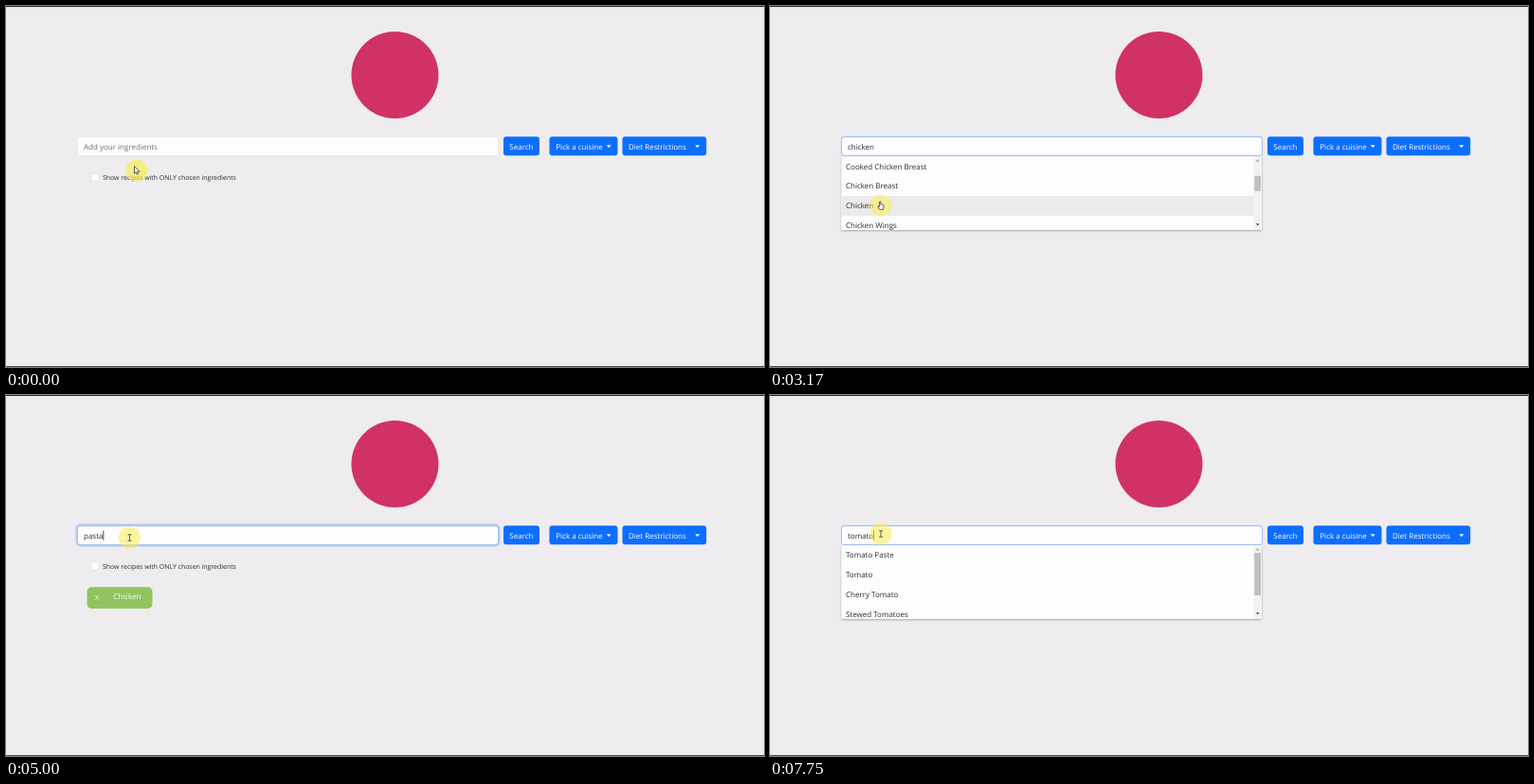
An HTML page that plays this animation: 800 px wide and 382 px high, repeating every 8 s.

```html
<!DOCTYPE html>
<html lang="en">
<head>
<meta charset="utf-8">
<title>Recipe search</title>
<style>
  html, body { margin: 0; width: 100%; height: 100%; overflow: hidden; background: #eeecee; }
  svg { display: block; width: 100%; height: 100%; }
  text { font: 8px "Open Sans", "Noto Sans", sans-serif; fill: #2b2e32; white-space: pre; text-rendering: geometricPrecision; }
  .blue { fill: #0d6efd; }
  .light { fill: #fff; }
  .paper { fill: #fdfcfe; }
  .icon { stroke-linejoin: round; stroke-linecap: round; }
</style>
</head>
<body>
<svg viewBox="0 0 800 382">
  <defs>
    <clipPath id="listClip"><rect id="clipBox" x="75.5" y="159" width="443.5"/></clipPath>
    <filter id="shadow" x="-5%" y="-20%" width="110%" height="150%">
      <feDropShadow dx="0" dy="1" stdDeviation="1.2" flood-opacity=".3"/>
    </filter>
  </defs>
  <rect width="800" height="382" fill="#eeecee"/>
  <rect width="800" height="1" fill="#29282b"/>
  <rect y="381" width="800" height="1" fill="#4a494c"/>
  <circle cx="410.5" cy="73" r="46" fill="#d03264"/>

  <g id="ring">
    <rect id="glow" fill="#b6cdf2"/>
    <rect x="75.5" y="138.4" width="444" height="20.1" rx="3" fill="#86b7fe"/>
  </g>
  <rect class="paper" x="76" y="139" width="443" height="19" rx="2.5"/>
  <text id="query" x="82" y="151.8"></text>
  <rect id="caret" y="143.5" width=".8" height="10" fill="#222"/>

  <g class="blue">
    <rect x="525" y="138.3" width="38" height="20" rx="3"/>
    <rect x="573.5" y="138.3" width="72" height="20" rx="3"/>
    <rect x="650.5" y="138.3" width="88.7" height="20" rx="3"/>
  </g>
  <text class="light" x="531.3" y="151.8">Search</text>
  <text class="light" x="580.3" y="151.8">Pick a cuisine</text>
  <text class="light" x="657" y="151.8">Diet Restrictions</text>
  <path class="light" d="M633.7 147.3h5l-2.5 2.6zM727.3 147.3h5l-2.5 2.6z"/>

  <rect class="paper" x="90.3" y="177.3" width="7.6" height="7.6" rx="1.5" stroke="#dedce0" stroke-width=".5"/>
  <text x="102" y="184.4" style="font-size:6.95px">Show recipes with ONLY chosen ingredients</text>
  <g id="tags"></g>

  <g id="list">
    <rect id="panel" class="paper" x="75.5" y="159" width="443.5" filter="url(#shadow)"/>
    <g clip-path="url(#listClip)">
      <rect id="hover" x="76" width="434.5" height="20.8" fill="#eceaed"/>
      <g id="rows"></g>
    </g>
    <g id="scrollbar">
      <rect x="510.3" y="159" width="8.7" height="78" fill="#f2f1f3"/>
      <rect id="thumb" x="511.2" width="6.8" fill="#c1c0c3"/>
      <path d="M512.8 164.4h3.8l-1.9-2.2z" fill="#a3a3a3"/>
      <path d="M512.8 230.2h3.8l-1.9 2.2z" fill="#505050"/>
    </g>
  </g>

  <g id="pointer">
    <circle id="halo" r="11.6" fill="#f8ee50"/>
    <g id="pulse" fill="none">
      <circle id="wave" stroke="#b09a16" stroke-width="1.5"/>
      <circle id="echo" stroke="#fffbb0" stroke-dasharray="1 1"/>
    </g>
    <path id="arrow" class="icon" d="M-2.5-4V3.2L-.8 1.7.5 4.3 1.7 3.7.5 1.2H2.7Z" fill="#fff" stroke="#333" stroke-width=".8"/>
    <path id="beam" class="icon" d="M-1.5-3.3H-.4L0-2.9.4-3.3H1.5M0-2.9V2.9M-1.5 3.3H-.4L0 2.9.4 3.3H1.5" fill="none" stroke-width=".8"/>
    <path id="hand" class="icon" d="M-1.4 1V-3.9Q-.8-5 -.1-3.9V-1.2L2.3-.7Q3.4-.3 3.1 1L2.4 4.3H-1.4L-3.4 1.2Q-3.2 0-1.4 1Z" fill="#fff" stroke="#333" stroke-width=".8"/>
  </g>
</svg>
<script>
const LOOP = 8000, ROW = 20.8, LIST_TOP = 159;
const $ = id => document.getElementById(id);
const set = (id, attrs) => { for (const k in attrs) $(id).setAttribute(k, attrs[k]); };
const show = (id, on) => { $(id).style.display = on ? "" : "none"; };

// Times of each search: click into the field, first key, list opens, item chosen.
const searches = [
  { word: "chicken", focus: 500, first: 750, opens: 1750, chosen: 3500, tag: "Chicken", tagX: 85.5, tagWidth: 69,
    items: ["Chicken Stock", "Chicken Thighs", "Chicken - Drumsticks", "Cooked Chicken Breast", "Chicken Breast",
      "Chicken", "Chicken Wings", "Chicken Broth", "Chicken Legs", "Whole Chicken", "Ground Chicken",
      "Chicken Livers", "Chicken Sausage", "Chicken Bouillon"] },
  { word: "pasta", focus: 4250, first: 4500, opens: 5250, chosen: 5920, tag: "Pasta", tagX: 159.5, tagWidth: 59.5,
    items: ["Pasta"] },
  { word: "tomato", focus: 6420, first: 6750, opens: 7500, chosen: Infinity,
    items: ["Tomato Paste", "Tomato", "Cherry Tomato", "Stewed Tomatoes", "Sun Dried Tomatoes"] }
];
const clicks = [-220, 500, 3420, 4250, 5920, 6420];
const path = [[0, 138, 174], [170, 138, 174], [500, 138, 152], [1750, 138, 152], [2170, 134, 211], [2300, 134, 209],
  [2420, 132, 180], [2670, 125, 184], [3000, 117, 211], [3800, 117, 211], [4250, 130.5, 151], [5250, 130.5, 151],
  [5600, 120.5, 169], [6000, 120.5, 169], [6420, 117, 147], [LOOP, 117, 147]];

const ease = u => u * u * (3 - 2 * u);
const ramp = (t, a, b) => ease(Math.min(1, Math.max(0, (t - a) / (b - a))));
// Screen updates come in alternating steps of 170 and 80 ms.
const step = t => { const base = Math.floor(t / 250) * 250; return t - base >= 170 ? base + 170 : base; };
const keyTime = (search, i) => step(search.first + i * 125 + 45);
const activeAt = t => searches.find(s => t >= s.focus && t < s.chosen);
const isOpen = t => { const s = activeAt(t); return !!s && t >= s.opens; };

function pointerAt(t) {
  const i = Math.max(1, path.findIndex(p => p[0] >= t));
  const [a, b] = [path[i - 1], path[i]], u = ramp(t, a[0], b[0]);
  return { x: a[1] + (b[1] - a[1]) * u, y: a[2] + (b[2] - a[2]) * u };
}

function drawField(t, search) {
  const typed = search ? [...search.word].filter((_, i) => t >= keyTime(search, i)).join("") : "";
  const lastKey = typed ? keyTime(search, typed.length - 1) : search && search.focus;
  $("query").textContent = typed || "Add your ingredients";
  $("query").style.fill = typed ? "#2b2e32" : "#6c7278";
  const edge = isOpen(t) ? 0.6 : 2.1;
  show("ring", search);
  set("glow", { x: 75.5 - edge, y: 138.4 - edge, width: 444 + 2 * edge, height: 20.1 + 2 * edge, rx: 3 + edge });
  show("caret", search && (t - lastKey) % 1060 < 530);
  set("caret", { x: 82 + (typed ? $("query").getComputedTextLength() : 0) });
}

function drawTags(t, pos) {
  $("tags").innerHTML = searches.filter(s => t >= s.chosen).map(s => {
    const over = pos.x > s.tagX && pos.x < s.tagX + s.tagWidth && pos.y > 203 && pos.y < 226;
    return `<rect x="${s.tagX}" y="203.2" width="${s.tagWidth}" height="22.8" rx="5" fill="${over ? "#cd5928" : "#91c45f"}"/>
      <text class="light" x="${s.tagX + 8.5}" y="216.7" style="font-size:7px">X</text>
      <text class="light" x="${s.tagX + 27.7}" y="216.4">${s.tag}</text>`;
  }).join("");
}

function drawList(t, search) {
  const open = isOpen(t);
  show("list", open);
  if (!open) return;
  const content = search.items.length * ROW, height = Math.min(78, content);
  const scroll = search === searches[0] ? 62 * ramp(t, 2500, 2920) : 0;
  set("panel", { height });
  set("clipBox", { height });
  $("rows").innerHTML = search.items.map((item, i) =>
    `<text x="80" y="${LIST_TOP + 13.2 + i * ROW - scroll}">${item}</text>`).join("");
  const y = pointerAt(t - 120).y, row = Math.floor((y - LIST_TOP + scroll) / ROW);
  show("hover", y > LIST_TOP && row < search.items.length);
  set("hover", { y: LIST_TOP + row * ROW - scroll });
  show("scrollbar", content > 78);
  set("thumb", { y: 167 + 60 * scroll / content, height: 60 * 78 / content });
}

function drawPointer(t, pos) {
  const overField = pos.y > 138 && pos.y < 159, overTag = pos.y > 203 && t >= 3500;
  const kind = overField || overTag ? "beam" : isOpen(t - 120) ? "hand" : "arrow";
  for (const id of ["arrow", "beam", "hand"]) show(id, id === kind);
  set("beam", { stroke: overTag ? "#f4dfa0" : "#333" });
  set("pointer", { transform: `translate(${pos.x} ${pos.y})` });
  const age = Math.min(...clicks.filter(c => c <= t).map(c => t - c)) / 420;
  show("pulse", age < 1);
  set("halo", { "fill-opacity": overTag ? .38 : age < 1 ? .65 : .55 });
  set("pulse", { transform: kind === "hand" ? "translate(-1.5 -4)" : "", opacity: Math.max(0, 1 - age) });
  const radius = 3.5 + 6.5 * Math.min(1, age);
  set("wave", { r: radius, opacity: age < .4 ? 1 : .2 });
  set("echo", { r: radius, opacity: age < .4 ? 0 : 1 });
}

function render(now) {
  const t = step(now % LOOP), search = activeAt(t), pos = pointerAt(t);
  drawField(t, search);
  drawTags(t, pos);
  drawList(t, search);
  drawPointer(t, pos);
}

const start = performance.now();
function tick() {
  render(performance.now() - start);
  requestAnimationFrame(tick);
}
tick();
</script>
</body>
</html>
```
